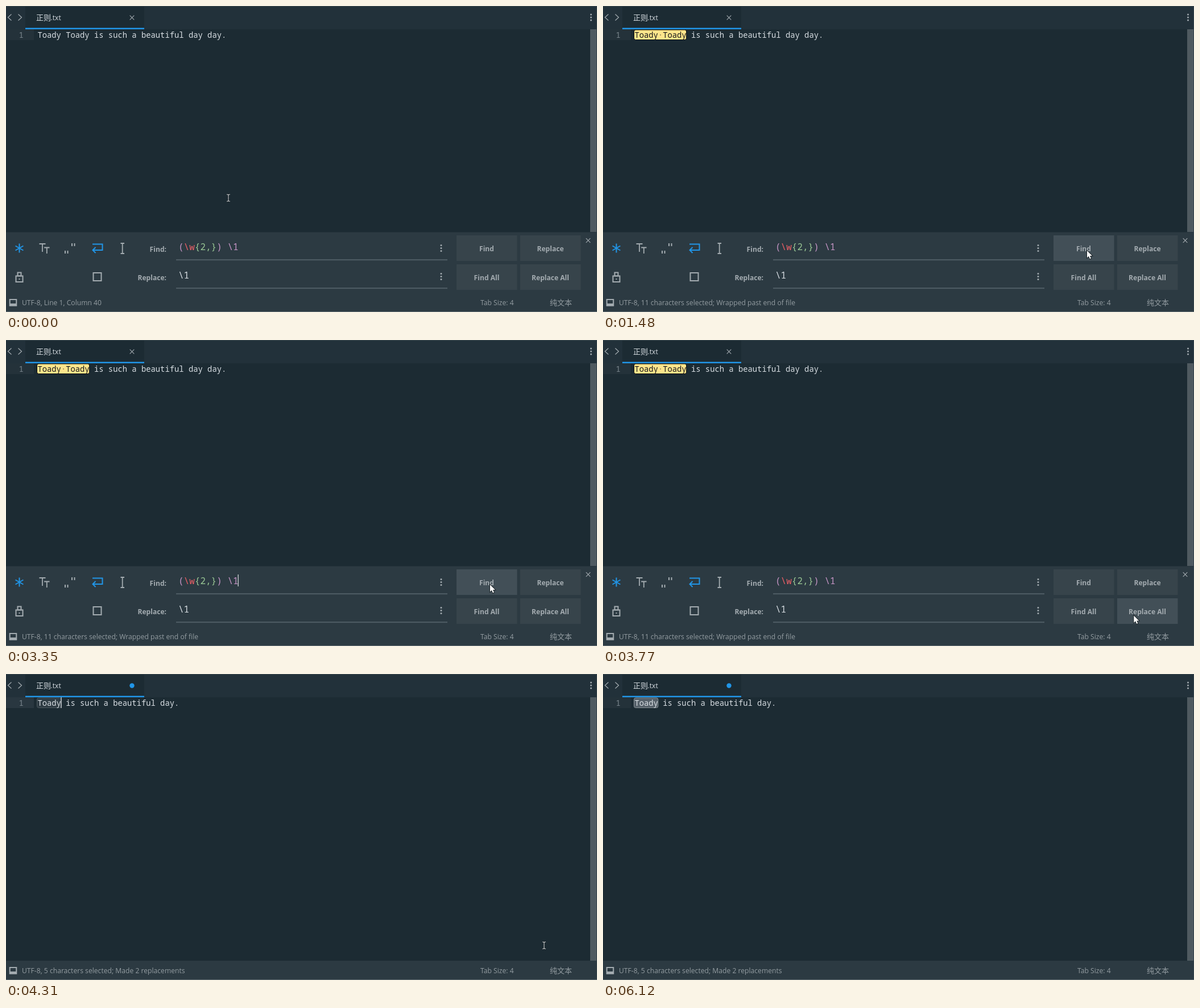
An HTML page with a canvas that plays this animation: 1039x539 px, repeating every 6220 ms.

```html
<!DOCTYPE html>
<html lang="en">
<head>
<meta charset="utf-8">
<title>Regex find and replace</title>
<style>
  html, body { margin: 0; width: 100%; height: 100%; overflow: hidden; background: #1c2b33; }
  canvas { display: block; }
</style>
</head>
<body>
<canvas id="stage" width="1039" height="539"></canvas>
<script>
const ctx = document.getElementById('stage').getContext('2d');
const LOOP = 6220, STEP = 125, REPLACED = 4310;

const C = {
  editor: '#1c2b33', bar: '#22313a', panel: '#2c3a42', button: '#37444b', hover: '#424f57',
  blue: '#2196e8', icon: '#a3abb0', dim: '#939ca1', text: '#d8dee3', rule: '#4c5a62',
  scroll: '#4f5a60', purple: '#c695c6', red: '#ec5f66', green: '#99c794', mark: '#ffe58b'
};
const UI = '12.15px "Open Sans", sans-serif';
const BOLD = '700 12.1px "Open Sans", sans-serif';
const CJK = '13px "Noto Sans CJK SC", "Noto Sans CJK", sans-serif';
const CODE = '500 13.83px "Noto Sans Mono", monospace';
const FIELD = '500 16px "Noto Sans Mono", monospace';
const CHAR = 8.298, TEXT_X = 55.4;

// The search itself decides what is selected and what the status says.
const BEFORE = 'Toady Toady is such a beautiful day day.';
const PATTERN = /(\w{2,}) \1/g;
const MATCHES = [...BEFORE.matchAll(PATTERN)];
const AFTER = BEFORE.replace(PATTERN, '$1');
const CLICKS = [760, 1980, 2980];

// Key points of the pointer; it eases from one to the next.
const PATH = [
  { t: 0, x: 391, y: 338 }, { t: 250, x: 872, y: 506 }, { t: 640, x: 851, y: 431 },
  { t: 3375, x: 851, y: 431 }, { t: 4000, x: 978, y: 515 }, { t: 4125, x: 946, y: 478 },
  { t: 5000, x: 946, y: 478 }, { t: 5600, x: 926, y: 530 }
];

const clamp = v => Math.max(0, Math.min(1, v));
const smooth = u => u * u * (3 - 2 * u);

function pointer(t) {
  const now = Math.floor(t / STEP + .2) * STEP;
  const i = PATH.findIndex(p => p.t > now);
  if (i < 0) return { kind: 'none' };
  const a = PATH[i - 1], b = PATH[i];
  const u = smooth((now - a.t) / (b.t - a.t));
  const kind = now >= 250 && t < 4170 ? 'arrow' : 'beam';
  return { x: a.x + (b.x - a.x) * u, y: a.y + (b.y - a.y) * u, kind };
}

// Caret opacity: short fades around a visible phase centred on `middle`.
function blink(t, middle) {
  return clamp(4.1 * Math.cos((t - middle) / 1020 * 2 * Math.PI) - 1.26);
}

function search(t) {
  if (t >= REPLACED) {
    const length = MATCHES[0][1].length;
    return { start: 0, length, status: `${length} characters selected; Made ${MATCHES.length} replacements` };
  }
  const clicks = CLICKS.filter(c => c <= t).length;
  if (!clicks) return { start: 0, length: 0, status: `Line 1, Column ${BEFORE.length}` };
  const index = (clicks - 1) % MATCHES.length;
  const { index: start, 0: { length } } = MATCHES[index];
  const wrapped = index ? '' : '; Wrapped past end of file';
  return { start, length, status: `${length} characters selected${wrapped}` };
}

function box(x, y, w, h, color) {
  ctx.fillStyle = color;
  ctx.fillRect(x, y, w, h);
}

function write(str, x, y, font, color, align = 'left') {
  ctx.font = font;
  ctx.fillStyle = color;
  ctx.textAlign = align;
  ctx.fillText(str, x, y);
}

// Strokes polylines given as flat coordinate lists.
function lines(color, width, ...paths) {
  ctx.strokeStyle = color;
  ctx.lineWidth = width;
  ctx.beginPath();
  for (const p of paths)
    for (let i = 0; i < p.length; i += 2) ctx[i ? 'lineTo' : 'moveTo'](p[i], p[i + 1]);
  ctx.stroke();
}

function disc(x, y, r, color) {
  ctx.fillStyle = color;
  ctx.beginPath();
  ctx.arc(x, y, r, 0, Math.PI * 2);
  ctx.fill();
}

function dots(x, y) {
  for (const d of [-5, 0, 5]) disc(x, y + d, 1.5, C.icon);
}

function cross(x, y) {
  const r = 3.8;
  lines(C.icon, 1.1, [x - r, y - r, x + r, y + r], [x + r, y - r, x - r, y + r]);
}

function chevron(x, y, w, h, color, width) {
  lines(color, width, [x + w, y - h, x, y, x + w, y + h]);
}

function frame(x, y, w, h) {
  ctx.strokeStyle = C.icon;
  ctx.lineWidth = 2;
  ctx.strokeRect(x, y, w, h);
}

function rounded(x, y, w, h, fill, stroke) {
  ctx.beginPath();
  ctx.roundRect(x, y, w, h, 3);
  ctx.fillStyle = fill;
  ctx.fill();
  ctx.strokeStyle = stroke;
  ctx.lineWidth = 1;
  ctx.stroke();
}

function caret(x, y, h, alpha) {
  ctx.globalAlpha = alpha;
  box(x, y, 1.5, h, '#e6eaed');
  ctx.globalAlpha = 1;
}

function drawTabs(dirty) {
  box(0, 0, 1039, 41, C.bar);
  box(34, 1, 209, 40, C.editor);
  box(34, 38.5, 209, 2.5, C.blue);
  chevron(3.5, 20, 6, 5.5, C.icon, 1.2);
  chevron(27.5, 20, -6, 5.5, C.icon, 1.2);
  write('正则', 53, 25, CJK, C.text);
  write('.txt', 78.5, 25, UI, C.text);
  if (dirty) disc(221.5, 20.5, 4.2, C.blue);
  else cross(221.5, 20.5);
  dots(1028.5, 20);
}

function drawEditor(t, done, { start, length }) {
  const text = done ? AFTER : BEFORE;
  const bright = t >= 6120;
  box(0, 41, 49, 19, done && !bright ? '#293740' : '#24323a');
  box(1027, 41, 11, (done ? 505 : 398) - 41, C.scroll);
  write('1', 22.5, 55.5, CODE, '#7b878e');

  const area = [TEXT_X + start * CHAR - .9, 42, length * CHAR + .9, 17.5];
  if (done) rounded(...area, bright ? '#56616a' : '#303d45', bright ? '#838d92' : '#4a565d');
  write(text, TEXT_X, 55.5, CODE, C.text);
  if (!done && length) {
    rounded(...area, C.mark, '#05090b');
    const found = text.substr(start, length);
    write(found, TEXT_X + start * CHAR, 55.5, CODE, '#15191b');
    disc(TEXT_X + (start + found.indexOf(' ') + .5) * CHAR, 51, 1, '#8d8154');
  }
  if (done) caret(96.3, 41, 19, blink(t, 4480));
}

function drawIcons() {
  for (let i = 0; i < 3; i++) {
    const a = Math.PI / 2 + i * Math.PI / 3, dx = 8 * Math.cos(a), dy = 8 * Math.sin(a);
    lines(C.blue, 2, [23.5 - dx, 426.5 - dy, 23.5 + dx, 426.5 + dy]);
  }
  for (const [x, y, r, h] of [[64, 419, 5.5, 14], [71.8, 425.5, 4.7, 10.5]])
    lines(C.icon, 1.8, [x - r, y, x + r, y], [x, y, x, y + h]);
  for (const [x, y] of [[103, 431], [115, 418]])
    for (const d of [0, 4.5]) box(x + d, y, 2, 5, C.icon);
  lines(C.blue, 2, [152, 419.5, 169.5, 419.5, 169.5, 430, 153, 430]);
  chevron(152.5, 430, 5, 5, C.blue, 2);
  lines(C.icon, 1.8, [204.7, 418, 204.7, 436], [201.5, 418, 208, 418], [201.5, 436, 208, 436]);
  frame(17.5, 475.5, 12, 10.5);
  frame(20.5, 469.5, 6, 6);
  box(22.5, 480, 2, 2, C.icon);
  frame(153.5, 470, 14, 14);
}

function drawField(y, label, parts) {
  write(label, 282, y + 2.5, BOLD, C.icon, 'right');
  let x = 303;
  for (const [part, color] of parts) {
    write(part, x, y, FIELD, color);
    x += ctx.measureText(part).width;
  }
  box(299, y + 16, 477, 2.2, C.rule);
  dots(765, y - 3.5);
}

function drawButton(label, x, y, mouse) {
  const over = mouse.x >= x && mouse.x < x + 106 && mouse.y >= y && mouse.y < y + 45;
  box(x, y, 106.5, 45, over ? C.hover : C.button);
  write(label, x + 53, y + 27.5, BOLD, C.icon, 'center');
}

function drawPanel(t, mouse) {
  box(0, 398.5, 1039, 107, C.panel);
  drawIcons();
  drawField(430, 'Find:', [['(', C.purple], ['\\w', C.red], ['{2,}', C.green], [') \\1', C.purple]]);
  drawField(480, 'Replace:', [['\\1', C.text]]);
  if (t > CLICKS[0]) caret(407.5, 413, 21, blink(t, 1140));
  ['Find', 'Replace'].forEach((label, i) => {
    drawButton(label, 792 + i * 112, 404, mouse);
    drawButton(label + ' All', 792 + i * 112, 455, mouse);
  });
  cross(1023.5, 413);
}

function drawStatus(message) {
  box(0, 505, 1039, 34, C.panel);
  frame(6.7, 517, 11.6, 10.7);
  box(6, 524, 13, 4.5, C.icon);
  write('UTF-8, ' + message, 28, 527, UI, C.dim);
  write('Tab Size: 4', 834, 527, UI, C.dim);
  write('纯文本', 956, 527, CJK, C.dim);
}

function drawMouse({ x, y, kind }) {
  if (kind === 'beam') {
    const ends = [-1, 1].flatMap(s => [-1, 1].map(v =>
      [x + 3 * s, y + 6 * v, x + s, y + 6 * v, x, y + 5 * v, x, y]));
    lines('#0d1519', 2.4, ...ends);
    lines('#d5dadd', 1.1, ...ends);
  } else if (kind === 'arrow') {
    const shape = new Path2D(`M${x} ${y}v12.5l2.9-2.7 2 4.7 2.1-.9-2-4.6h4z`);
    ctx.strokeStyle = '#11181c';
    ctx.lineWidth = 1.6;
    ctx.stroke(shape);
    ctx.fillStyle = '#fff';
    ctx.fill(shape);
  }
}

function draw(t) {
  const done = t >= REPLACED;
  const mouse = pointer(t);
  const result = search(t);
  box(0, 0, 1039, 539, C.editor);
  drawTabs(done);
  drawEditor(t, done, result);
  if (!done) drawPanel(t, mouse);
  drawStatus(result.status);
  box(0, 0, 1039, 1, '#38464d');
  box(1038, 0, 1, 539, '#35434a');
  box(0, 538, 1039, 1, '#5c686e');
  drawMouse(mouse);
}

const origin = performance.now();
function tick() {
  draw((performance.now() - origin) % LOOP);
  requestAnimationFrame(tick);
}
tick();
</script>
</body>
</html>
```
